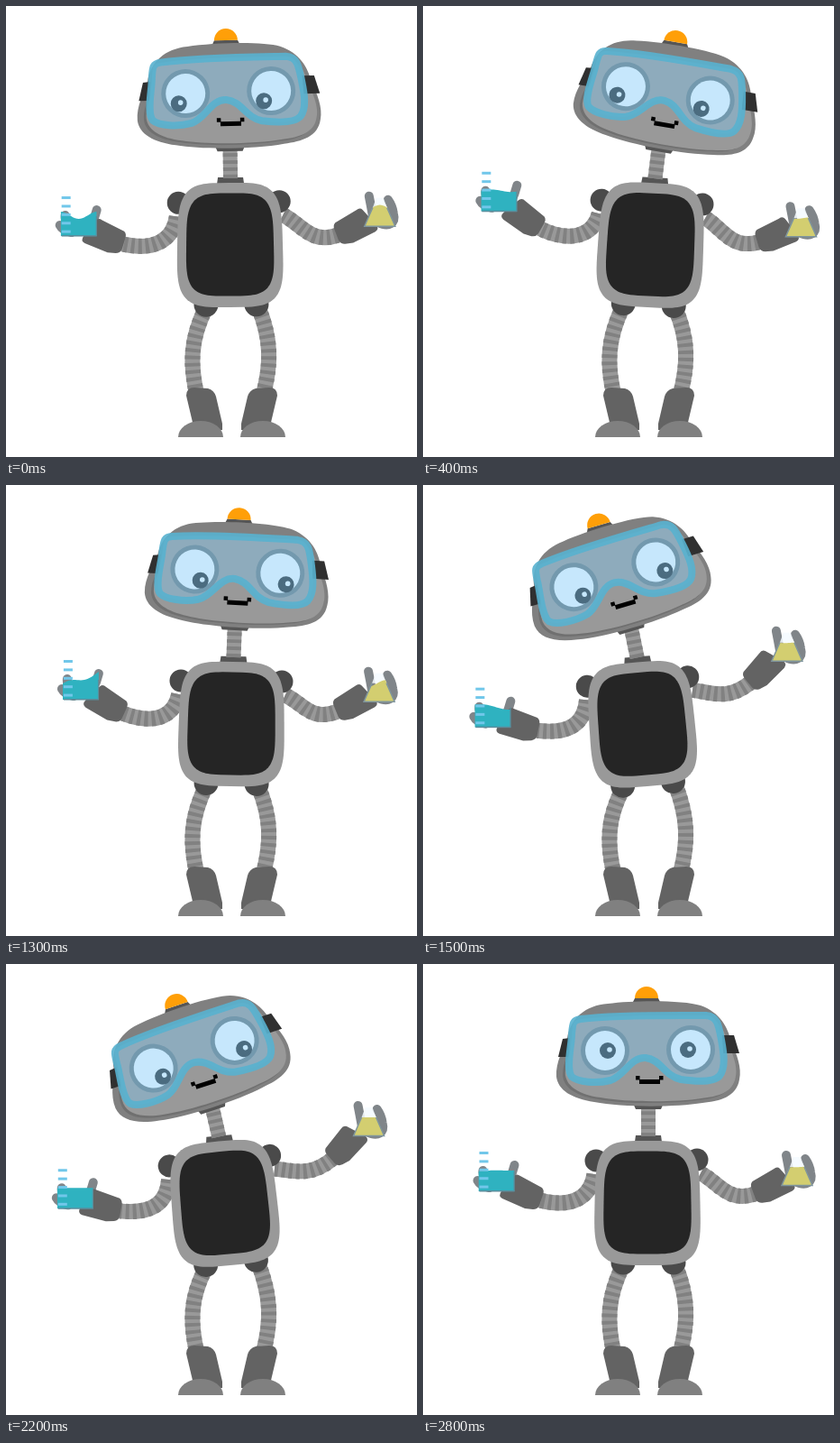
Animation of 456 by 500 pixels, one loop 3100 ms. Source, as an HTML page with a canvas:

```html
<!DOCTYPE html>
<html lang="en">
<head>
<meta charset="utf-8">
<title>Robot chemist</title>
<style>
html, body { margin: 0; width: 100%; height: 100%; overflow: hidden; background: #fff; }
canvas { display: block; width: 456px; height: 500px; }
</style>
</head>
<body>
<canvas id="stage" width="456" height="500"></canvas>
<script>
const ctx = document.getElementById('stage').getContext('2d');
const LOOP = 3100, STEP = 100;
const RAD = Math.PI / 180;
const HIP = [249, 336], NECK = [250, 192], CHIN = [250, 160];

// lean moves the head sideways; left and right lower the hands; gx, gy aim the pupils
const middle = { lean: 0, left: 0, right: 0, gx: 0, gy: 0 };
const toRight = { lean: 34, left: -24, right: 10, gx: -8, gy: 11 };
const toLeft = { lean: -60, left: 18, right: -53, gx: 7, gy: 12 };

// start and time: the body's swing; kick and tilt: when and how far the liquid sloshes
const moves = [
  { from: middle, to: toRight, start: -80, time: 320, kick: 0, tilt: 2 },
  { from: toRight, to: toLeft, start: 1030, time: 600, kick: 1100, tilt: 12 },
  { from: toLeft, to: middle, start: 2150, time: 500, kick: 2300, tilt: -6 }
];

const clamp = v => Math.min(1, Math.max(0, v));
const mix = (a, b, p) => a + (b - a) * p;
const add = (a, b) => [a[0] + b[0], a[1] + b[1]];

// Pulls back first, then swings over and settles
function swing(x) {
  const z = 2 * x;
  return z < 1 ? z * z * (4 * z - 3) / 2 : 1 - (2 - z) ** 3 / 2;
}

function poseAt(t) {
  const m = moves.filter(m => m.start <= t).pop();
  const x = clamp((t - m.start) / m.time);
  const p = swing(x), look = clamp((x - 0.1) * 8);
  const pose = {};
  for (const k in middle) pose[k] = mix(m.from[k], m.to[k], k[0] === 'g' ? look : p);
  return pose;
}

function slosh(t) {
  const m = moves.filter(m => m.kick <= t).pop();
  const age = t - m.kick, q = clamp(1 - age / 550);
  return {
    tilt: q * m.tilt * Math.sin(age * Math.PI / 300),
    wave: u => 4 * q * Math.cos(3.1 * u + Math.PI - age / 200)
  };
}

function turn([x, y], deg, [cx, cy] = [0, 0]) {
  const c = Math.cos(deg * RAD), s = Math.sin(deg * RAD);
  return [cx + (x - cx) * c - (y - cy) * s, cy + (x - cx) * s + (y - cy) * c];
}

function pivot([x, y], deg) {
  ctx.translate(x, y);
  ctx.rotate(deg * RAD);
  ctx.translate(-x, -y);
}

function group(draw) {
  ctx.save();
  draw();
  ctx.restore();
}

function fill(path, color) {
  ctx.fillStyle = color;
  ctx.fill(path);
}

function poly(color, ...pts) {
  const path = new Path2D();
  for (let i = 0; i < pts.length; i += 2) path.lineTo(pts[i], pts[i + 1]);
  fill(path, color);
}

function disc(x, y, r, color, from = 0, ry = r) {
  const path = new Path2D();
  path.ellipse(x, y, r, ry, 0, from, 2 * Math.PI);
  fill(path, color);
}

const dome = (x, y, r, ry, color) => disc(x, y, r, color, Math.PI, ry);

function box(x, y, w, h, color) {
  ctx.fillStyle = color;
  ctx.fillRect(x, y, w, h);
}

// Superellipse, a little wider below than above
function pebble(x, y, rx, ry, flare) {
  const path = new Path2D();
  const bend = v => Math.sign(v) * Math.sqrt(Math.abs(v));
  for (let a = 0; a < 360; a += 3) {
    const v = bend(Math.sin(a * RAD));
    path.lineTo(x + rx * bend(Math.cos(a * RAD)) * (1 + flare * v), y + ry * v);
  }
  path.closePath();
  return path;
}

const skull = new Path2D('M205 44C235 40 290 40 308 46C330 54 338 70 342 86C348 100 354 115 351 128C348 147 330 152 310 154C280 159 220 159 190 153C165 149 150 140 148 125C147 108 156 95 160 82C164 60 180 46 205 44Z');
const goggles = new Path2D('M175 61C215 56 285 57 314 57C327 58 328 68 331 84C334 100 336 115 329 124C322 132 300 130 286 128C268 124 264 106 247 104C230 103 224 124 208 129C192 133 172 131 165 125C158 116 165 90 165 78C166 66 166 62 175 61Z');
const shaft = new Path2D('M200 432Q200 423 209 423L224 424Q231 426 233 433L240 463V470H209Z');
const forearm = new Path2D('M-29 -27Q-26 -30 -22 -27L2 -14Q5 -11 3 -6L-1 6Q-3 10 -8 10L-17 9L-42 -2Q-47 -5 -43 -10Z');
const shell = pebble(249, 265, 58.5, 69, 0.025);
const panel = pebble(249, 264.5, 48.5, 57, 0.02);

function tube(a, b, c, d, width = 17) {
  const path = new Path2D();
  path.moveTo(...a);
  path.bezierCurveTo(...b, ...c, ...d);
  ctx.lineWidth = width;
  ctx.strokeStyle = '#999';
  ctx.stroke(path);
  ctx.setLineDash([4, 4]);
  ctx.strokeStyle = '#818181';
  ctx.stroke(path);
  ctx.setLineDash([]);
}

function finger(d) {
  ctx.lineCap = 'round';
  ctx.lineWidth = 10;
  ctx.strokeStyle = '#808589';
  ctx.stroke(new Path2D(d));
  ctx.lineCap = 'butt';
}

// Liquid in a vessel standing on (0, 0)
function pour(base, rim, height, level, color, lift) {
  group(() => {
    const glass = new Path2D();
    glass.moveTo(-base, 0);
    glass.lineTo(-rim, -height);
    glass.lineTo(rim, -height);
    glass.lineTo(base, 0);
    ctx.clip(glass);
    const liquid = new Path2D();
    liquid.moveTo(base, 0);
    liquid.lineTo(-base, 0);
    for (let u = -1; u <= 1.01; u += 0.1) liquid.lineTo(u * base, -level - lift(u));
    fill(liquid, color);
  });
}

function legs(tilt) {
  tube(turn([222, 334], tilt, HIP), [204, 370], [204, 398], [212, 432]);
  tube(turn([280, 334], tilt, HIP), [294, 368], [295, 396], [285, 432]);
  for (const flip of [false, true]) group(() => {
    if (flip) { ctx.translate(501, 0); ctx.scale(-1, 1); }
    fill(shaft, '#636363');
    dome(216, 478, 25, 18, '#808080');
  });
}

function torso(tilt) {
  group(() => {
    pivot(HIP, tilt);
    disc(192, 218, 12.5, '#4a4a4a');
    disc(304, 217, 12.5, '#4a4a4a');
    disc(222, 331, 13.5, '#4a4a4a');
    disc(278, 331, 13.5, '#4a4a4a');
    poly('#555', 235, 197, 236, 190, 264, 190, 265, 197);
    fill(shell, '#999');
    fill(panel, '#252525');
  });
}

function leftArm(drop, tilt, flow) {
  const deg = -0.46 * drop;
  const elbow = [130 - 0.2 * Math.max(0, drop), 262 + 0.63 * drop];
  const root = turn([190, 233], tilt, HIP);
  const grip = add(elbow, turn([-48.5, -10], deg));
  tube(root, add(root, turn([-4, 26], deg / 2)), add(elbow, turn([35, 9], deg)), elbow);
  group(() => {
    ctx.translate(...grip);
    finger('M13 -10Q18 -20 20 -29');
    finger('M-8 -4Q-18 -6 -21 -12');
    finger('M-6 -10Q-16 -15 -15 -23');
  });
  group(() => {
    ctx.translate(...elbow);
    pivot([0, 0], deg);
    fill(forearm, '#636363');
  });
  group(() => {
    ctx.translate(...grip);
    pour(20, 20, 46, 23, '#2fb2c0', u => flow.tilt * u + flow.wave(u));
    box(-19, -1, 39, 1.5, '#5b8e9d');
    box(19, -22, 1.2, 22, '#5b8e9d');
    for (let i = 0; i < 5; i++) box(-19, -44 + i * 9.4, 10, 3, '#71c7ea');
  });
}

function rightArm(drop, tilt, flow) {
  const deg = 0.38 * drop;
  const elbow = [368 + drop * (drop > 0 ? 0.4 : 0.11), 255 + 0.7 * drop];
  const root = turn([308, 232], tilt, HIP);
  const grip = add(elbow, turn([47, -9], deg));
  tube(root, add(root, turn([20, 10], deg)), add(elbow, turn([-30, 10], deg)), elbow);
  group(() => {
    ctx.translate(...grip);
    finger('M-8 -13Q-10 -24 -12 -34');
    finger('M-2 -5C10 1 18 -4 15 -15Q14 -23 9 -30');
  });
  group(() => {
    ctx.translate(...elbow);
    pivot([0, 0], deg - 54);
    ctx.scale(-1, 1);
    pivot([0, 0], -52);
    fill(forearm, '#636363');
  });
  group(() => {
    ctx.translate(...grip);
    poly('rgba(244,250,255,.85)', -8, -21, -4, -32, 4, -32, 8, -21);
    pour(17, 3, 34, 21, '#d3ce70', u => 0.5 * flow.tilt * u - 0.8 * flow.wave(u));
    ctx.lineWidth = 1.5;
    ctx.strokeStyle = '#7f959d';
    ctx.stroke(new Path2D('M-8 -21L-17 -.5H17L8 -21'));
  });
}

function eye(x, y, gx, gy) {
  disc(x, y, 27, '#7399ae');
  disc(x, y, 22, '#c6e7fc');
  disc(x + gx, y + gy, 9, '#4b6c80');
  disc(x + gx + 2, y + gy - 1, 2.8, '#c6e7fc');
}

function head(gx, gy) {
  poly('#555', 231, 46, 235, 38, 261, 38, 265, 46);
  dome(248, 38, 13, 13, '#ff9f08');
  poly('#555', 233, 154, 267, 154, 264, 161, 236, 161);

  fill(skull, '#808080');
  // Face with a shaded lower left edge; the crown keeps the rim colour
  group(() => {
    ctx.beginPath();
    ctx.rect(140, 64, 220, 100);
    ctx.clip();
    ctx.translate(250, 104);
    ctx.scale(0.93, 0.9);
    ctx.translate(-250, -102);
    fill(skull, '#707070');
    ctx.translate(3, -2);
    fill(skull, '#999');
  });

  poly('#303030', 155, 83, 163, 82, 161, 103, 150, 103);
  poly('#303030', 332, 79, 345, 79, 351, 99, 333, 99);

  fill(goggles, '#8eabbc');
  const cross = 3 * (1 - gy / 12);
  eye(202, 96, gx + cross, gy);
  eye(297, 95, gx - cross, gy);
  ctx.lineWidth = 8;
  ctx.lineJoin = 'round';
  ctx.strokeStyle = 'rgba(88,178,208,.9)';
  ctx.stroke(goggles);

  box(236, 124, 4.5, 4.5, '#000');
  box(240, 128, 23, 5, '#000');
  box(262, 124, 4.5, 4.5, '#000');
}

function draw(t) {
  box(0, 0, 456, 500, '#fff');
  const pose = poseAt(t), flow = slosh(t), tilt = 0.086 * pose.lean;
  legs(tilt);
  leftArm(pose.left, tilt, flow);
  rightArm(pose.right, tilt, flow);
  torso(tilt);
  group(() => {
    pivot(HIP, tilt);
    pivot(NECK, 0.12 * pose.lean);
    tube([250, 191], [250, 180], [250, 170], [250, 158], 16);
    pivot(CHIN, 0.085 * pose.lean);
    head(pose.gx, pose.gy);
  });
}

function tick(now) {
  draw(Math.floor(now % LOOP / STEP) * STEP);
  requestAnimationFrame(tick);
}
draw(0);
requestAnimationFrame(tick);
</script>
</body>
</html>
```
